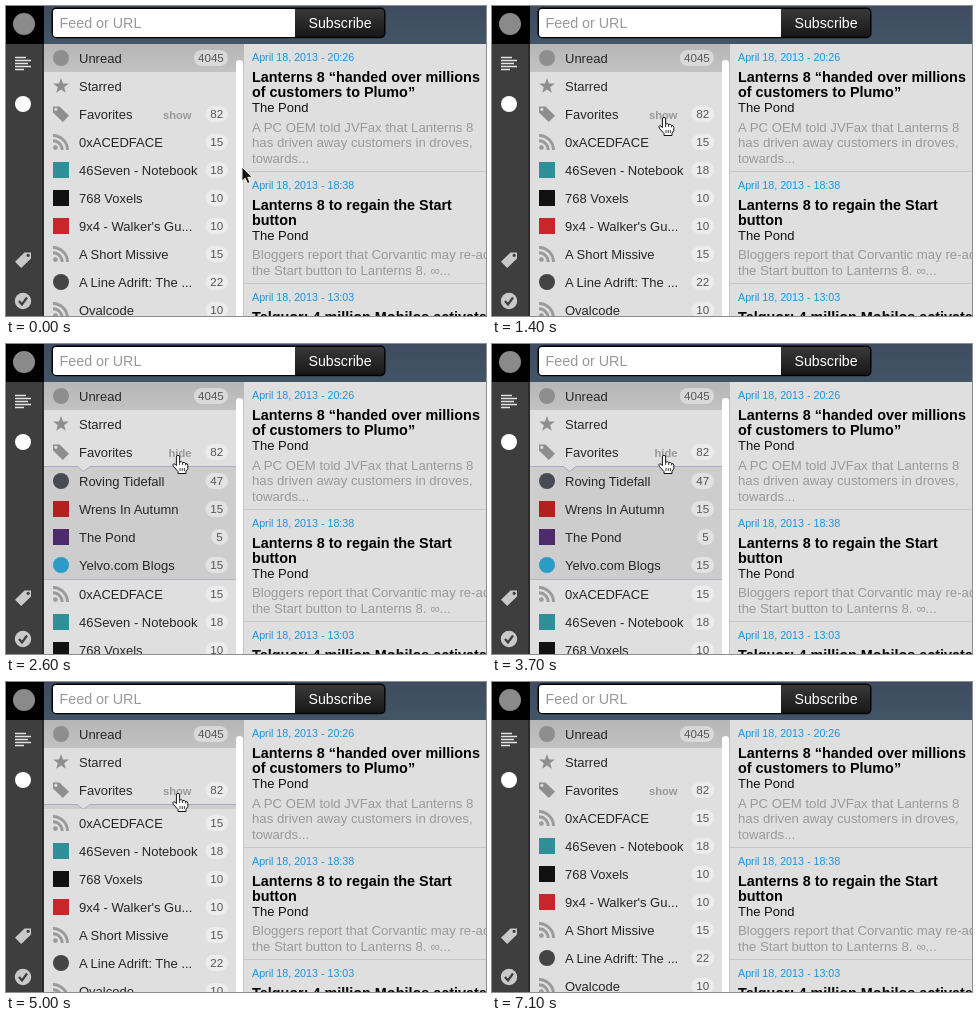
An HTML page for the animation above (7.3 s loop, 480 px wide and 310 px high).

```html
<!DOCTYPE html>
<html lang="en">
<head>
<meta charset="utf-8">
<title>Feed reader</title>
<style>
  html, body { margin: 0; width: 100%; height: 100%; overflow: hidden; background: #dfdfdf; }
  svg { display: block; width: 480px; height: 310px; }
  text { font: 13px "Liberation Sans", Arial, sans-serif; fill: #262626; white-space: pre; }
  .field { font-size: 14.3px; fill: #999; }
  .button { font-size: 14.2px; fill: #fff; }
  .count { font-size: 11.6px; fill: #555; text-anchor: middle; }
  .toggle { font-size: 11.2px; font-weight: bold; fill: #999; text-anchor: end; }
  .date { font-size: 10.7px; fill: #1a94dc; }
  .title { font-size: 14.4px; font-weight: bold; fill: #000; }
  .site { fill: #111; }
  .body { font-size: 13.2px; fill: #999; }
</style>
</head>
<body>
<svg viewBox="0 0 480 310">
  <defs>
    <linearGradient id="bar" x2="0" y2="1"><stop stop-color="#3f4b60"/><stop offset="1" stop-color="#425567"/></linearGradient>
    <linearGradient id="dark" x2="0" y2="1"><stop stop-color="#3a3a3a"/><stop offset="1" stop-color="#161616"/></linearGradient>
    <linearGradient id="active" x2="0" y2="1"><stop stop-color="#b6b6b6"/><stop offset="1" stop-color="#c2c2c2"/></linearGradient>
    <clipPath id="drawer"><rect id="opening" x="38" y="122" width="192" height="0"/></clipPath>
    <g id="rss" fill="none" stroke="#9a9a9a" stroke-width="2.9">
      <circle cx="-5.6" cy="5.6" r="2.4" fill="#9a9a9a" stroke="none"/>
      <path d="M-8-1.2a9.2 9.2 0 0 1 9.2 9.2M-8-6.5a14.5 14.5 0 0 1 14.5 14.5"/>
    </g>
    <path id="star" d="M0-8 2-2.6 7.8-2.4 3.2 1.2 4.8 6.8 0 3.6-4.8 6.8-3.2 1.2-7.8-2.4-2-2.6Z"/>
    <path id="tag" fill-rule="evenodd" d="M-8-7.5h6.5L8 1.8 1.8 8-8-1.5ZM-5.2-6.2a1.6 1.6 0 1 0 .1 0Z"/>
  </defs>

  <rect width="480" height="310" fill="#dfdfdf"/>
  <g id="list"></g>
  <path d="M230 310V57q0-3 3.5-3t3.5 3v253Z" fill="#fff"/>
  <path d="M237.5 66V310" stroke="#c4c4c4"/>
  <g id="articles"></g>

  <rect x="38" width="442" height="38" fill="url(#bar)"/>
  <rect x="46.2" y="2.2" width="332.6" height="29.3" rx="4" fill="url(#dark)" stroke="#000" stroke-width="1.4"/>
  <path d="M289 3H50q-3 0-3 3v22q0 3 3 3h239Z" fill="#fff"/>
  <text class="field" x="53.5" y="21.5">Feed or URL</text>
  <text class="button" x="302.5" y="21.5">Subscribe</text>

  <rect width="38" height="310" fill="#3e3e3e"/>
  <rect width="38" height="38"/>
  <path d="M37 38V310" stroke="#2c2c2c" stroke-width="2"/>
  <circle cx="18" cy="18" r="11" fill="#8a8a8a"/>
  <path d="M9 51.5h11M9 54.5h16M9 57.5h13M9 60.5h16M9 63.5h9" stroke="#e4e4e4" stroke-width="1.6"/>
  <circle cx="17" cy="98" r="8" fill="#fff"/>
  <use href="#tag" transform="translate(17 254) scale(-1 1)" fill="#c9c9c9"/>
  <circle cx="17" cy="295" r="8.2" fill="#c9c9c9"/>
  <path d="M13 295l3 3.5 5-7" fill="none" stroke="#3e3e3e" stroke-width="2.2"/>

  <path id="arrow" d="M0 0V14.2L3.2 11.2 5.5 16.6 8 15.5 5.7 10.3H10.2Z" fill="#111" stroke="#fff" stroke-width=".9"/>
  <g id="hand" fill="#fff" stroke="#111" stroke-linejoin="round">
    <path d="M-1.6 1Q-1.6-.7 0-.7T1.6 1V6Q4.3 5 4.6 6.7 7.2 5.9 7.5 7.6 9.8 7.2 9.8 9.3V12.5L8 15.5V17.5H0V15.5L-4.5 10.6Q-6 8.4-4.4 7.8-3 7.5-1.6 9.6Z"/>
    <path d="M1.6 6V9M4.6 6.7V9M7.5 7.6V9.4M2 12V15M4.3 12V15M6.4 12V15" stroke-width=".8"/>
  </g>
</svg>
<script>
const $ = id => document.getElementById(id);
const PERIOD = 7300, STEP = 100, SLIDE = 300;
const OPEN_AT = 2307, CLOSE_AT = 4740, DRAWER = 114;

const text = (cls, x, y, str) => `<text class="${cls}" x="${x}" y="${y}">${str}</text>`;
const use = id => y => `<use href="#${id}" x="55" y="${y}" fill="#8e8e8e"/>`;
const disc = color => y => `<circle cx="55" cy="${y}" r="8" fill="${color}"/>`;
const square = color => y => `<rect x="47" y="${y - 8}" width="16" height="16" fill="${color}"/>`;

function pill(y, count) {
  const width = 11 + 5.8 * count.length;
  return `<rect x="${222 - width}" y="${y - 8}" width="${width}" height="16" rx="8" fill="#fff" opacity=".42"/>` +
    text("count", 222 - width / 2, y + 4.2, count);
}
const row = (y, [icon, name, count]) =>
  icon(y) + text("", 73, y + 4.7, name) + (count ? pill(y, count) : "");
const rows = (top, items) => items.map((item, i) => row(top + 28 * i, item)).join("");

const fixed = [
  [disc("#8e8e8e"), "Unread", "4045"],
  [use("star"), "Starred"],
  [use("tag"), "Favorites", "82"]
];
const favorites = [
  [disc("#454a55"), "Roving Tidefall", "47"],
  [square("#b3211f"), "Wrens In Autumn", "15"],
  [square("#4d2a6c"), "The Pond", "5"],
  [disc("#2a9cc6"), "Yelvo.com Blogs", "15"]
];
const feeds = [
  [use("rss"), "0xACEDFACE", "15"],
  [square("#2f8f98"), "46Seven - Notebook", "18"],
  [square("#111"), "768 Voxels", "10"],
  [square("#c9252b"), "9x4 - Walker's Gu...", "10"],
  [use("rss"), "A Short Missive", "15"],
  [disc("#444"), "A Line Adrift: The ...", "22"],
  [use("rss"), "Ovalcode", "10"]
];

$("list").innerHTML = `
  <rect x="38" y="38" width="200" height="28" fill="url(#active)"/>
  ${rows(52, fixed)}
  <text class="toggle" id="toggle" x="185.5" y="112.5"></text>
  <g clip-path="url(#drawer)">
    <rect x="38" y="122" width="192" height="${DRAWER}" fill="#cdcdce"/>
    <path d="M38 235.5H230" stroke="#b4b6bd"/>
    <path d="M71 122H84L77.5 127Z" fill="#dfdfdf"/>
    <path d="M38 122.5H71L77.5 127.5 84 122.5H230" fill="none" stroke="#a9abc2"/>
    ${rows(137, favorites)}
  </g>
  <g id="feeds">${rows(136, feeds)}</g>`;

$("articles").innerHTML = [
  ["date", 55, "April 18, 2013 - 20:26"],
  ["title", 76, "Lanterns 8 “handed over millions"],
  ["title", 91, "of customers to Plumo”"],
  ["site", 106, "The Pond"],
  ["body", 126, "A PC OEM told JVFax that Lanterns 8"],
  ["body", 141, "has driven away customers in droves,"],
  ["body", 157, "towards..."],
  ["date", 183, "April 18, 2013 - 18:38"],
  ["title", 204, "Lanterns 8 to regain the Start"],
  ["title", 219, "button"],
  ["site", 234, "The Pond"],
  ["body", 253, "Bloggers report that Corvantic may re-add"],
  ["body", 269, "the Start button to Lanterns 8. ∞..."],
  ["date", 295, "April 18, 2013 - 13:03"],
  ["title", 316, "Telquor: 4 million Mobilos activated"]
].map(([cls, y, str]) => text(cls, 246, y, str)).join("") +
  `<path d="M238 165.5H480M238 277.5H480" stroke="#c6c6c6"/>`;

const clamp = v => Math.min(1, Math.max(0, v));
const swing = v => .5 - Math.cos(Math.PI * clamp(v)) / 2;

// Pointer stops: time, x, y
const stops = [[0, 236, 161], [800, 176, 114], [1100, 173, 113], [1400, 172, 112],
  [5800, 172, 112], [6000, 114, 87]];

function pointer(t) {
  const next = stops.findIndex(s => s[0] > t);
  if (next < 0) return stops[stops.length - 1].slice(1);
  const [t0, x0, y0] = stops[next - 1], [t1, x1, y1] = stops[next];
  const k = swing((t - t0) / (t1 - t0));
  return [x0 + (x1 - x0) * k, y0 + (y1 - y0) * k];
}

function draw(now) {
  const t = Math.floor(now % PERIOD / STEP) * STEP;
  const height = Math.round(DRAWER * (swing((t - OPEN_AT) / SLIDE) - swing((t - CLOSE_AT) / SLIDE)));
  $("opening").setAttribute("height", height);
  $("feeds").setAttribute("transform", `translate(0 ${height})`);
  $("toggle").textContent = t > OPEN_AT && t < CLOSE_AT ? "hide" : "show";

  const [x, y] = pointer(t).map(Math.round);
  const overToggle = x > 155 && x < 187 && y > 103 && y < 117;
  for (const id of ["arrow", "hand"]) {
    $(id).setAttribute("transform", `translate(${x} ${y})`);
    $(id).setAttribute("visibility", t < 6100 && overToggle === (id === "hand") ? "visible" : "hidden");
  }
}

const start = performance.now();
function tick() {
  draw(performance.now() - start);
  requestAnimationFrame(tick);
}
tick();
</script>
</body>
</html>
```
